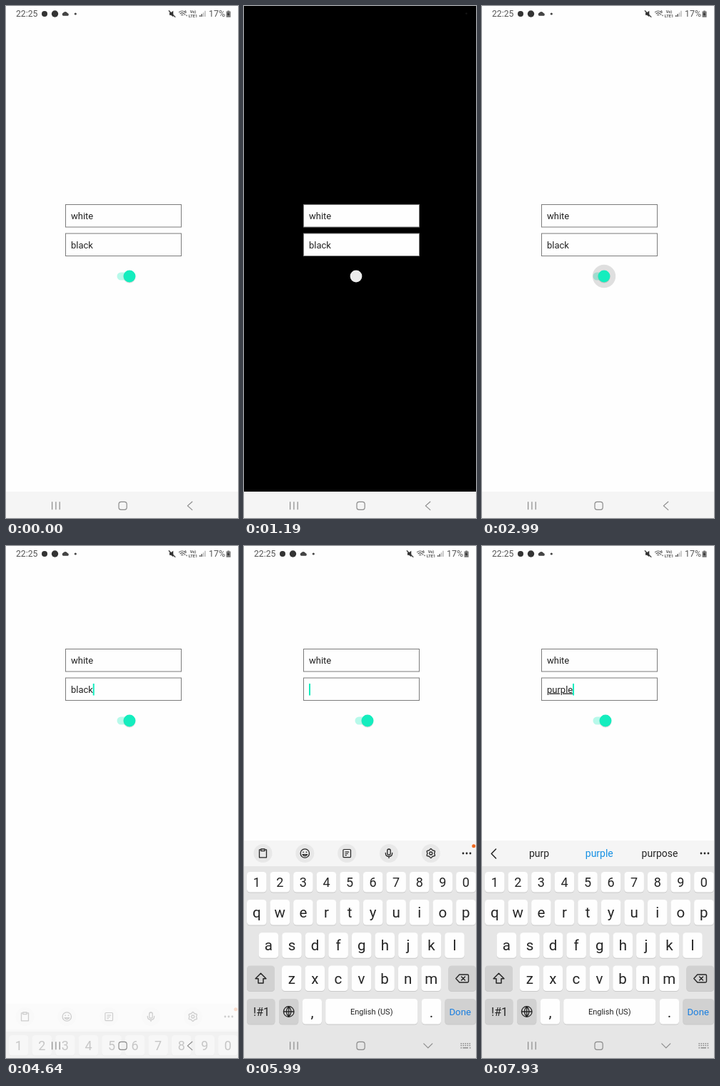
Recreate the animation shown at these times as an HTML page. Size 325x718 px, loop 8000 ms.

```html
<!DOCTYPE html>
<html lang="en">
<head>
<meta charset="utf-8">
<title>Switch and text fields</title>
<style>
  html, body { margin: 0; width: 100%; height: 100%; overflow: hidden; background: #fefefe; }
  svg { display: block; width: 325px; height: 718px; font-family: Roboto, sans-serif; }
  .line { fill: none; stroke-linecap: round; stroke-linejoin: round; }
  .mid { text-anchor: middle; }
</style>
</head>
<body>
<svg id="stage" viewBox="0 0 325 718" xmlns="http://www.w3.org/2000/svg">
  <rect id="page" width="325" height="681"/>
  <g id="status" fill="#555">
    <text x="14" y="15.2" font-size="12.2">22:25</text>
    <circle cx="54" cy="11" r="4" fill="#333"/>
    <circle cx="68.5" cy="11" r="4.7" fill="#333"/>
    <path d="M80 13.8a2.3 2.3 0 0 1 .2-4.2a3.3 3.3 0 0 1 6 .5a2 2 0 0 1 .6 3.7z" fill="#444"/>
    <circle cx="97.3" cy="11" r="1.6" fill="#444"/>
    <path d="M229 9.2h2l3.3-2.4v8.4l-3.3-2.4h-2z" fill="#333"/>
    <path class="line" d="M228.3 6.8l8.6 8.6" stroke="#333" stroke-width="1.3"/>
    <path class="line" d="M242.5 8.6q4.3-3.2 8.4 0M244 10.7q2.8-2.1 5.4 0M245.6 12.7q1.2-.8 2.3 0" stroke="#555" stroke-width="1.1"/>
    <text x="250" y="10.2" font-size="5" font-weight="700">6</text>
    <path d="M249.3 12.4l1.2-1.6 1.2 1.6zM251.9 12.8l1.2 1.8 1.2-1.8z"/>
    <g class="mid" font-weight="700" font-size="5.6">
      <text x="262" y="10.2">Vo)</text><text x="262" y="16">LTE1</text>
    </g>
    <path d="M271 13h1.5v2h-1.5zM273.4 11.3h1.5v3.7h-1.5z"/>
    <path d="M275.8 9.2h1.5v5.8h-1.5zM278.2 6.8h1.5v8.2h-1.5z" fill="#bbb"/>
    <text x="284" y="15.2" font-size="12.4">17%</text>
    <path d="M310.3 6.4h2.6v1.2h1.7v8.2h-6V7.6h1.7z" fill="#777"/>
    <path d="M312 8.5l-2.2 3.4h1.6l-.5 2.4 2.3-3.4h-1.6z" fill="#222"/>
  </g>
  <circle id="speck" cx="311.5" cy="10.5" r="1.2" fill="#161616"/>

  <g id="form">
    <g id="fields" fill="#fefefe" stroke="#7b7b7b">
      <rect x="83.5" y="278.5" width="162" height="31.5"/>
      <rect x="83.5" y="319" width="162" height="31.5"/>
    </g>
    <g font-size="13" fill="#222">
      <text x="91" y="299">white</text>
      <text id="entry" x="91" y="339.5">black</text>
    </g>
    <rect id="caret" y="327" width="2" height="16.5" fill="#14edbe"/>
    <rect id="track" x="155.5" y="373.5" width="19.5" height="11" rx="5.5"/>
    <circle id="ripple" cy="379"/>
    <circle id="shade" cy="379.8" r="8.6" fill="#000" opacity=".14"/>
    <circle id="thumb" cy="379" r="8.4"/>
  </g>

  <rect y="681" width="325" height="37" fill="#f5f5f5"/>
  <g id="board"></g>
  <g class="line" stroke="#8b8b8b" stroke-width="1.2">
    <path d="M64.6 695.3v11M69.9 695.3v11M75.2 695.3v11" stroke-linecap="butt"/>
    <rect x="158" y="695.3" width="11.2" height="11" rx="3.3"/>
    <path id="back" d="M260.8 695.2l-6.4 5.7 6.4 5.7"/>
    <path id="down" d="M251.8 697.8l6 6 6-6"/>
    <g id="keysIcon" stroke-linecap="butt" stroke-width="1.5">
      <path d="M303.5 697.7h14M303.5 700.5h14" stroke-dasharray="1.6 1.4"/>
      <path d="M303.5 703.7h1.6M306.5 703.7h7.5M315.9 703.7h1.6"/>
    </g>
  </g>
</svg>
<script>
const $ = id => document.getElementById(id);
const TEAL = '#14edbe', OFF = '#ececec', INK = '#252525', GREY = '#d1d1d1';
const LOOP = 8000;

const put = (id, attrs) => {
  for (const name in attrs) $(id).setAttribute(name, attrs[name]);
};
const show = (id, on) => put(id, { visibility: on ? 'visible' : 'hidden' });

// Keyboard
const label = (x, y, size, text, fill = INK) =>
  `<text class="mid" x="${x}" y="${y}" font-size="${size}" fill="${fill}">${text}</text>`;

const key = (id, x, y, w, h, fill = '#fefefe') =>
  `<rect x="${x}" y="${y + 1}" width="${w}" height="${h}" rx="4.5" fill="#c9c9c9"/>
   <rect id="k-${id}" data-fill="${fill}" x="${x}" y="${y}" width="${w}" height="${h}" rx="4.5" fill="${fill}"/>`;

const row = (chars, x, y, h, size, base) => [...chars].map((c, i) => {
  const left = x + i * 32.57;
  return key(c, left, y, 27.5, h) + label(left + 13.75, base, size, c);
}).join('');

const icon = (d, width = 1.3) =>
  `<path class="line" d="${d}" stroke="${INK}" stroke-width="${width}"/>`;

function gear(cx, cy) {
  const points = [];
  for (let i = 0; i < 24; i++) {
    const a = i * Math.PI / 12, r = 5.6 + Math.cos(a * 6) * .9;
    points.push((cx + r * Math.sin(a)).toFixed(1) + ' ' + (cy + r * Math.cos(a)).toFixed(1));
  }
  return 'M' + points.join('L') + 'z';
}

const ring = (x, y, r) => `M${x - r} ${y}a${r} ${r} 0 1 0 ${2 * r} 0a${r} ${r} 0 1 0 ${-2 * r} 0`;

const tools = `<g id="tools">
  ${[26.5, 85.3, 144.2, 203, 261.8].map(x => `<circle cx="${x}" cy="431" r="13" fill="#e8e8e8"/>`).join('')}
  ${icon('M23 425.8h-1.5v11h10v-11h-1.5M23.8 425h5.2v2.6h-5.2z')}
  ${icon(ring(85.3, 431, 6.2) + 'M82 432.6q3.3 4 6.6 0z')}
  ${icon('M83.1 429.2v.2M87.5 429.2v.2', 1.6)}
  ${icon('M140.2 425.5h8a1.3 1.3 0 0 1 1.3 1.3v8.6a1.3 1.3 0 0 1-1.3 1.3h-8a1.3 1.3 0 0 1-1.3-1.3v-8.6a1.3 1.3 0 0 1 1.3-1.3zM142 429.2h4.6M142 431.5h3.4M142 433.6h1.4', 1.2)}
  ${icon('M200.8 427.2a2.2 2.2 0 0 1 4.4 0v3.8a2.2 2.2 0 0 1-4.4 0zM198.3 430.5q0 5 4.7 5t4.7-5M203 435.5v2')}
  ${icon(gear(261.8, 431) + ring(261.8, 431, 2))}
  <circle cx="321.8" cy="420.8" r="2.5" fill="#f0691e"/>
</g>`;

const hints = `<g id="hints">
  ${icon('M19.5 425l-6.3 6.5 6.3 6.5', 1.5)}
  ${[80, 164.3, 249].map((x, i) =>
    `<text id="hint${i}" class="mid" x="${x}" y="436.3" font-size="14" fill="${i === 1 ? '#1590e4' : INK}"></text>`).join('')}
</g>`;

$('board').innerHTML = `
  <rect y="413" width="325" height="36" fill="#f5f5f5"/>
  <rect y="449" width="325" height="269" fill="#e6e6e6"/>
  ${tools}${hints}
  ${[307, 312, 317].map(x => `<circle cx="${x}" cy="431" r="1.4" fill="${INK}"/>`).join('')}
  ${row('1234567890', 4, 457, 28.5, 18, 477.5)}
  ${row('qwertyuiop', 4, 496, 35.5, 20.5, 521)}
  ${row('asdfghjkl', 20.7, 542.3, 35.5, 20.5, 567)}
  ${row('zxcvbnm', 53, 588.5, 35.5, 20.5, 613.5)}
  ${key('shift', 4, 588.5, 39, 35.5, GREY)}
  ${icon('M23.5 599.2l7.4 7.6h-3.9v6.2h-7v-6.2h-3.9z', 1.5)}
  ${key('del', 286.3, 588.5, 38.7, 35.5, GREY)}
  ${icon('M301.8 601h11.3a1.4 1.4 0 0 1 1.4 1.4v8.2a1.4 1.4 0 0 1-1.4 1.4h-11.3l-5-5.5zM304.6 604l5 5M309.6 604l-5 5', 1.4)}
  ${key('sym', 4, 635, 39.5, 35.5, GREY)}${label(24.5, 658.8, 16, '!#1')}
  ${key('globe', 49, 635, 27.3, 35.5, GREY)}
  ${icon(ring(62.7, 653, 7.3) + 'M55.5 653h14.4M62.7 645.8v14.4M62.7 645.8q-6.6 7.2 0 14.4q6.6-7.2 0-14.4', 1.3)}
  ${key('comma', 81.8, 635, 27.3, 35.5)}${label(95.5, 661, 21, ',')}
  ${key('space', 114.2, 635, 129, 35.5)}${label(178.7, 657, 11, 'English (US)')}
  ${key('dot', 248.8, 635, 27.3, 35.5)}${label(262.5, 661, 21, '.')}
  ${key('done', 281.3, 635, 43.7, 35.5, GREY)}${label(302.7, 658, 13.2, 'Done', '#1a7fe0')}`;

// Each step overrides the state before it.
const start = {
  dark: false, on: true, x: 173, ripple: null,
  board: 0, drop: 0, text: 'black', caret: false, typing: false, hints: null, press: null
};
const steps = [
  [0, {}],
  [900, { dark: true, on: false, ripple: [167, 371, 7.5, '#14edbe', .1] }],
  [1050, { x: 159, ripple: null }],
  [1190, { x: 157 }],
  [2840, { on: true }],
  [2990, { dark: false, x: 171, ripple: [171, 379, 16.2, '#000', .12] }],
  [3140, { x: 173, ripple: [173, 379, 16.2, '#000', .05] }],
  [3290, { ripple: null }],
  [4640, { board: .22, drop: 229, caret: true }],
  [4790, { board: .8, drop: 50 }],
  [4940, { board: .97, drop: 8 }],
  [5090, { board: 1, drop: 0 }],
  [5240, { caret: false }],
  [5390, { caret: true, press: 'del', text: 'blac' }],
  [5540, { text: 'bla' }],
  [5690, { text: 'b' }],
  [5840, { text: '' }],
  [5990, { press: null }],
  [6440, { caret: false }],
  [6890, { caret: true, typing: true, text: 'p', press: 'p' }],
  [7040, { press: null, hints: ['p', 'please', 'people'] }],
  [7190, { text: 'pu', press: 'u' }],
  [7340, { text: 'pur', press: 'r', hints: ['pu', 'put', 'public'] }],
  [7490, { text: 'purp', press: 'p', hints: ['pur', 'pure', 'purpose'] }],
  [7640, { press: null, hints: ['purp', 'purple', 'purpose'] }],
  [7790, { text: 'purpl' }],
  [7930, { text: 'purple' }]
];
let last = start;
const states = steps.map(([at, change]) => (last = { at, ...last, ...change, at }));

function draw(s) {
  put('page', { fill: s.dark ? '#000' : '#fefefe' });
  show('status', !s.dark);
  show('speck', s.dark);

  put('form', { transform: `translate(0 ${s.board ? -134 : 0})` });
  $('entry').textContent = s.text;
  put('entry', { 'text-decoration': s.typing ? 'underline' : 'none' });
  put('caret', { x: 91 + (s.text ? $('entry').getComputedTextLength() - .2 : 0) });
  show('caret', s.caret);

  put('track', { fill: s.on ? TEAL : '#000', opacity: .3 });
  put('thumb', { cx: s.x, fill: s.on ? TEAL : OFF });
  put('shade', { cx: s.x });
  show('ripple', s.ripple);
  if (s.ripple) {
    const [cx, cy, r, fill, opacity] = s.ripple;
    put('ripple', { cx, cy, r, fill, opacity });
  }

  put('board', { transform: `translate(0 ${s.drop})`, opacity: s.board, display: s.board ? 'inline' : 'none' });
  const open = s.board > .5;
  show('back', !open);
  show('down', open);
  show('keysIcon', open);
  show('tools', !s.hints);
  show('hints', s.hints);
  (s.hints || []).forEach((word, i) => { $('hint' + i).textContent = word; });
  document.querySelectorAll('[data-fill]').forEach(k =>
    k.setAttribute('fill', k.id === 'k-' + s.press ? '#bcbcbc' : k.dataset.fill));
}

const origin = performance.now();
let shown = null;
function tick() {
  const t = (performance.now() - origin) % LOOP;
  const state = states.findLast(s => s.at <= t) || states[0];
  if (state !== shown) draw(shown = state);
  requestAnimationFrame(tick);
}
tick();
</script>
</body>
</html>
```
